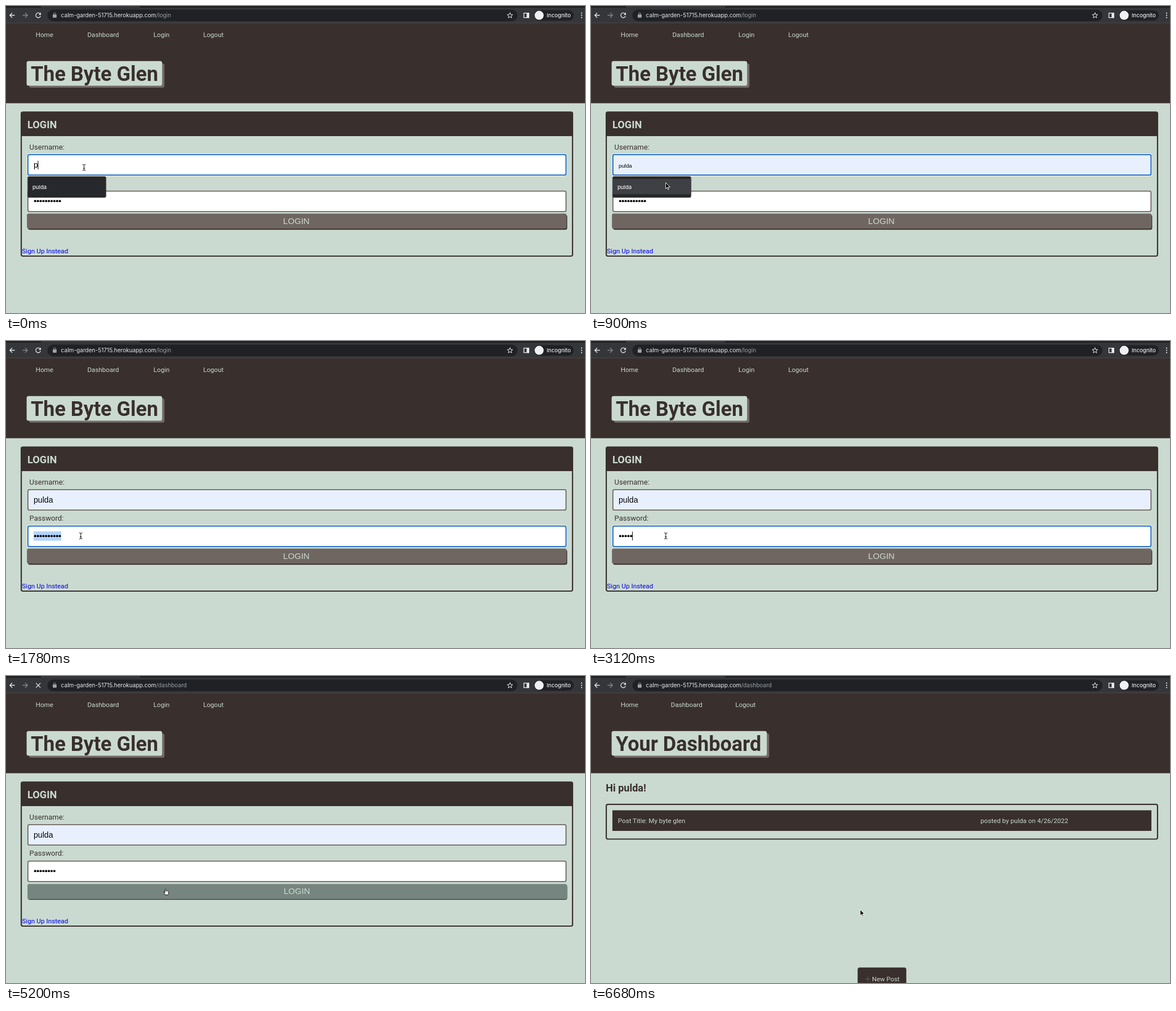
Animation of 1028 by 545 pixels, one loop 8000 ms. Source, as an HTML page:

```html
<!DOCTYPE html>
<html lang="en">
<head>
<meta charset="utf-8">
<title>Blog login</title>
<style>
  html, body { margin: 0; width: 100%; height: 100%; overflow: hidden; background: #cadad0; }
  svg { display: block; width: 1028px; height: 545px; }
  text { white-space: pre; }
  .page { font-family: Roboto, "Open Sans", sans-serif; font-size: 11.6px; fill: #cadad0; }
  .page .label { font-size: 13px; fill: #392f2d; }
  .page .link { font-size: 11.8px; fill: #0000ee; }
  .page .title { font-size: 36px; font-weight: 700; fill: #392f2d; }
  .page .head { font-size: 18.2px; font-weight: 700; }
  .page .hello { font-size: 18px; font-weight: 700; fill: #392f2d; }
  .page .field { font-family: "Liberation Sans", Arial, sans-serif; font-size: 14.1px; fill: #000; }
  .page .press { font-family: "Liberation Sans", Arial, sans-serif; font-size: 15.1px; }
  .ui { font-family: Inter, Roboto, sans-serif; font-size: 10.1px; fill: #e8eaed; }
  .page .hint { font-family: Inter, Roboto, sans-serif; font-size: 9.5px; font-weight: 500; fill: #f1f2f3; }
  .dark { fill: #392f2d; }
  .mint { fill: #cadad0; }
  .shade { fill: #736a66; }
  .icon { fill: none; stroke: #e8eaed; stroke-width: 1.3; }
  .box { stroke: #706764; stroke-width: 1.8; fill: #fff; }
  .halo { fill: none; stroke: #eef4f4; stroke-width: 1; }
</style>
</head>
<body>
<svg viewBox="0 0 1028 545">
  <rect class="mint" width="1028" height="545"/>

  <g class="page">
    <rect class="dark" y="30" width="1028" height="142.6"/>
    <text x="52.7" y="55">Home</text>

    <g id="login">
      <text x="144.5" y="55">Dashboard</text>
      <text x="261.8" y="55">Login</text>
      <text x="350.2" y="55">Logout</text>
      <rect class="shade" x="41" y="102" width="240.3" height="43" rx="3.5"/>
      <rect class="mint" x="36.6" y="97.8" width="240.6" height="43.6" rx="3.5"/>
      <text class="title" x="44" y="133">The Byte Glen</text>

      <rect x="27.1" y="188.4" width="978.8" height="255.6" rx="3" fill="none" stroke="#392f2d" stroke-width="2.2"/>
      <rect class="dark" x="26.5" y="188" width="980" height="43" rx="2"/>
      <text class="head" x="38" y="216.8">LOGIN</text>

      <text class="label" x="41.6" y="254.8">Username:</text>
      <rect id="userHalo" class="halo" x="37.4" y="262.4" width="958.2" height="39.2" rx="4"/>
      <rect id="userBox" class="box" x="38.9" y="263.9" width="955.4" height="36.2" rx="2.6"/>
      <text id="user" class="field" x="49" y="287"></text>

      <text class="label" x="41.6" y="318.8">Password:</text>
      <rect id="passHalo" class="halo" x="37.4" y="326.8" width="958.2" height="39.2" rx="4"/>
      <rect id="passBox" class="box" x="38.9" y="328.6" width="955.4" height="36.2" rx="2.6"/>
      <rect id="selection" x="49" y="338" width="49" height="16.5" fill="#b2d4fb"/>
      <g id="dots" fill="#000"></g>
      <rect id="caret" width="1" height="15.5" fill="#000"/>

      <g id="menu">
        <rect x="37.4" y="302" width="141.2" height="39.6" rx="4" fill="#000" opacity=".16"/>
        <rect x="38.4" y="302.4" width="139.2" height="37.6" rx="3" fill="#27282c"/>
        <rect id="menuRow" x="38.4" y="307" width="139.2" height="27" fill="#3f4044"/>
        <text class="hint" x="47" y="324.6"></text>
      </g>

      <rect class="dark" x="39" y="370.5" width="957.4" height="26.7" rx="3.5"/>
      <g id="button">
        <rect id="buttonFace" x="37.2" y="368.4" width="958" height="26.8" rx="3.2"/>
        <text class="press" x="492" y="386.6">LOGIN</text>
      </g>
      <text class="link" x="28.3" y="439.2">Sign Up Instead</text>
    </g>

    <g id="dashboard">
      <text x="141.8" y="55">Dashboard</text>
      <text x="256.2" y="55">Logout</text>
      <rect class="shade" x="41" y="102" width="275.3" height="43" rx="3.5"/>
      <rect class="mint" x="36.6" y="97.8" width="275.6" height="43.6" rx="3.5"/>
      <text class="title" x="44" y="133">Your Dashboard</text>
      <text class="hello" x="26.2" y="205">Hi pulda!</text>
      <rect x="27.1" y="227.9" width="978.8" height="61.6" rx="3" fill="none" stroke="#392f2d" stroke-width="2.2"/>
      <rect class="dark" x="38" y="238.4" width="957" height="36.6"/>
      <text x="47.8" y="261">Post Title: My byte glen</text>
      <text x="691.6" y="261">posted by pulda on 4/26/2022</text>
      <rect class="dark" x="473.4" y="517.4" width="86.4" height="40" rx="3.5"/>
      <path d="M487 538h9M491.5 533.5v9" stroke="#51494a" stroke-width="1.8"/>
      <text x="499" y="542" font-size="11.4">New Post</text>
    </g>
  </g>

  <g class="ui">
    <rect width="1028" height="30" fill="#35363a"/>
    <path d="M0 0H62V3H0zM238 0H1028V3H238z" fill="#202124"/>
    <rect y="29.5" width="1028" height="1" fill="#4c4a4b"/>
    <rect x="73.5" y="6.5" width="834.5" height="20.5" rx="10.2" fill="#202124"/>
    <path class="icon" d="M15.6 16.5H7M11 12.3L6.8 16.5L11 20.7"/>
    <path class="icon" d="M29.4 16.5H38M34 12.3L38.2 16.5L34 20.7" style="stroke:#85868a"/>
    <g id="reload">
      <path class="icon" d="M60.6 13.7A4.3 4.3 0 1 0 61.4 17.6"/>
      <path d="M62 11.6v4.2h-4.2z"/>
    </g>
    <path id="stop" class="icon" d="M53.2 12.6l8 8M61.2 12.6l-8 8"/>
    <rect x="83" y="15" width="6.8" height="5.8" rx=".8" fill="#a0a4a9"/>
    <path d="M84.6 15.4v-1.6a1.8 1.8 0 0 1 3.6 0v1.6" fill="none" stroke="#a0a4a9"/>
    <text x="97.6" y="20.3">calm-garden-51715.herokuapp.com<tspan id="path" fill="#9aa0a6"></tspan></text>
    <path class="icon" id="star" style="stroke-width:1"/>
    <rect class="icon" x="919.5" y="12.6" width="8.6" height="8"/>
    <rect x="924.4" y="12" width="4.4" height="9.2"/>
    <rect x="937.5" y="7.4" width="70.5" height="18.6" rx="9.3" fill="#202124"/>
    <circle cx="946.6" cy="16.6" r="8" fill="#eef0f2"/>
    <text x="960" y="20.2" font-size="9.6" font-weight="500">Incognito</text>
    <circle cx="1022" cy="12.6" r="1.1"/><circle cx="1022" cy="16.6" r="1.1"/><circle cx="1022" cy="20.6" r="1.1"/>
  </g>

  <g id="cursor" stroke-linejoin="round" stroke-linecap="round">
    <g id="beam" fill="none">
      <path d="M-2.4-5.4Q0-5.4 0-3.8Q0-5.4 2.4-5.4M0-4V4M-2.4 5.4Q0 5.4 0 3.8Q0 5.4 2.4 5.4M-1.3 1.6H1.3" stroke="#fff" stroke-width="2" opacity=".6"/>
      <path d="M-2.4-5.4Q0-5.4 0-3.8Q0-5.4 2.4-5.4M0-4V4M-2.4 5.4Q0 5.4 0 3.8Q0 5.4 2.4 5.4M-1.3 1.6H1.3" stroke="#111"/>
    </g>
    <path id="arrow" d="M0 0V10.2L2.4 8L4 11.8L5.6 11.1L4 7.4H7.2Z" fill="#000" stroke="#fff" stroke-width=".9"/>
    <path id="hand" d="M-1.7 1V-4.6Q-.8-6 .1-4.6V-1.5Q1-2.2 1.8-1.3Q2.8-1.8 3.3-.8Q4.6-1 4.6.4Q4.8 3 3.6 5.6H-1.2Q-2.4 3.4-4-.1Q-3.2-1.5-1.7 1Z" fill="#fff" stroke="#111" stroke-width=".9"/>
  </g>
</svg>

<script>
const LOOP = 8000;
const NAME = "pulda";
const DOT_STEP = 4.87;
const $ = id => document.getElementById(id);

// Each step holds until the next and only lists what changes.
const steps = [
  [0, { view: "login", path: "/login", user: "p", focus: "user", menu: "open", dots: 10,
        caret: true, cursor: "beam", at: [138.6, 286.6] }],
  [150, { user: "pu" }],
  [300, { user: "pul" }],
  [750, { cursor: "arrow", at: [135, 303] }],
  [900, { user: NAME, preview: true, filled: true, caret: false, menu: "hover", at: [132.6, 314] }],
  [1050, { at: [132.6, 316] }],
  [1200, { preview: false, menu: "", caret: true }],
  [1350, { at: [132.6, 323] }],
  [1490, { cursor: "beam", at: [132.8, 341] }],
  [1640, { focus: "pass", at: [132.8, 346] }],
  [1780, { selected: true, caret: false }],
  [2380, { selected: false, caret: true, dots: 2 }],
  [2530, { dots: 3 }],
  [2670, { dots: 4 }],
  [3120, { dots: 5 }],
  [3420, { dots: 6 }],
  [3710, { dots: 7 }],
  [4010, { dots: 8 }],
  [4300, { at: [142, 350] }],
  [4450, { at: [180, 360] }],
  [4600, { cursor: "hand", hover: true, at: [228, 374] }],
  [4750, { at: [265, 381] }],
  [4900, { at: [284, 383] }],
  [5050, { focus: "", caret: false }],
  [5200, { path: "/dashboard", loading: true }],
  [5350, { view: "dashboard", loading: false, cursor: "arrow", at: [313.6, 319.4] }],
  [5500, { at: [349, 267] }],
  [6540, { at: [424, 350] }],
  [6680, { at: [478, 415] }],
];

const show = (id, on) => $(id).setAttribute("display", on ? "inline" : "none");
const set = (id, attrs) => {
  for (const key in attrs) $(id).setAttribute(key, attrs[key]);
};

function build() {
  document.querySelector(".hint").textContent = NAME;
  let dots = "";
  for (let i = 0; i < 10; i++) {
    dots += `<circle cx="${51.8 + i * DOT_STEP}" cy="346.3" r="2"/>`;
  }
  $("dots").innerHTML = dots;

  const points = Array.from({ length: 10 }, (_, i) => {
    const r = i % 2 ? 2.2 : 5.2, a = i * Math.PI / 5;
    return `${894.8 + r * Math.sin(a)} ${16.9 - r * Math.cos(a)}`;
  });
  $("star").setAttribute("d", `M${points.join("L")}Z`);
}

function draw(s) {
  show("login", s.view === "login");
  show("dashboard", s.view === "dashboard");
  show("reload", !s.loading);
  show("stop", s.loading);
  $("path").textContent = s.path;

  $("user").textContent = s.user;
  $("user").style.fontSize = s.preview ? "9.7px" : "";
  $("userBox").style.fill = s.filled ? "#e8f0fe" : "#fff";
  for (const id of ["user", "pass"]) {
    const on = s.focus === id;
    show(id + "Halo", on);
    $(id + "Box").style.stroke = on ? "#1263c5" : "";
  }
  show("selection", s.selected);
  [...$("dots").children].forEach((dot, i) =>
    dot.setAttribute("display", i < s.dots ? "inline" : "none"));

  show("caret", s.caret);
  if (s.caret && s.view === "login") {
    const inUser = s.focus === "user";
    const x = inUser ? 49 + $("user").getComputedTextLength() - .4 : 48.7 + s.dots * DOT_STEP;
    set("caret", { x, y: inUser ? 274.6 : 338.4 });
  }

  show("menu", s.menu);
  show("menuRow", s.menu === "hover");
  set("button", { transform: s.hover ? "translate(.9 .9)" : "" });
  set("buttonFace", { fill: s.hover ? "#778580" : "#706661" });

  for (const id of ["beam", "arrow", "hand"]) show(id, s.cursor === id);
  set("cursor", { transform: `translate(${s.at})` });
}

let current = -1;
function tick(now) {
  const t = now % LOOP;
  const index = steps.findLastIndex(step => step[0] <= t);
  if (index !== current) {
    current = index;
    draw(Object.assign({}, ...steps.slice(0, index + 1).map(step => step[1])));
  }
  requestAnimationFrame(() => tick(performance.now() - start));
}

build();
const start = performance.now();
tick(0);
</script>
</body>
</html>
```
